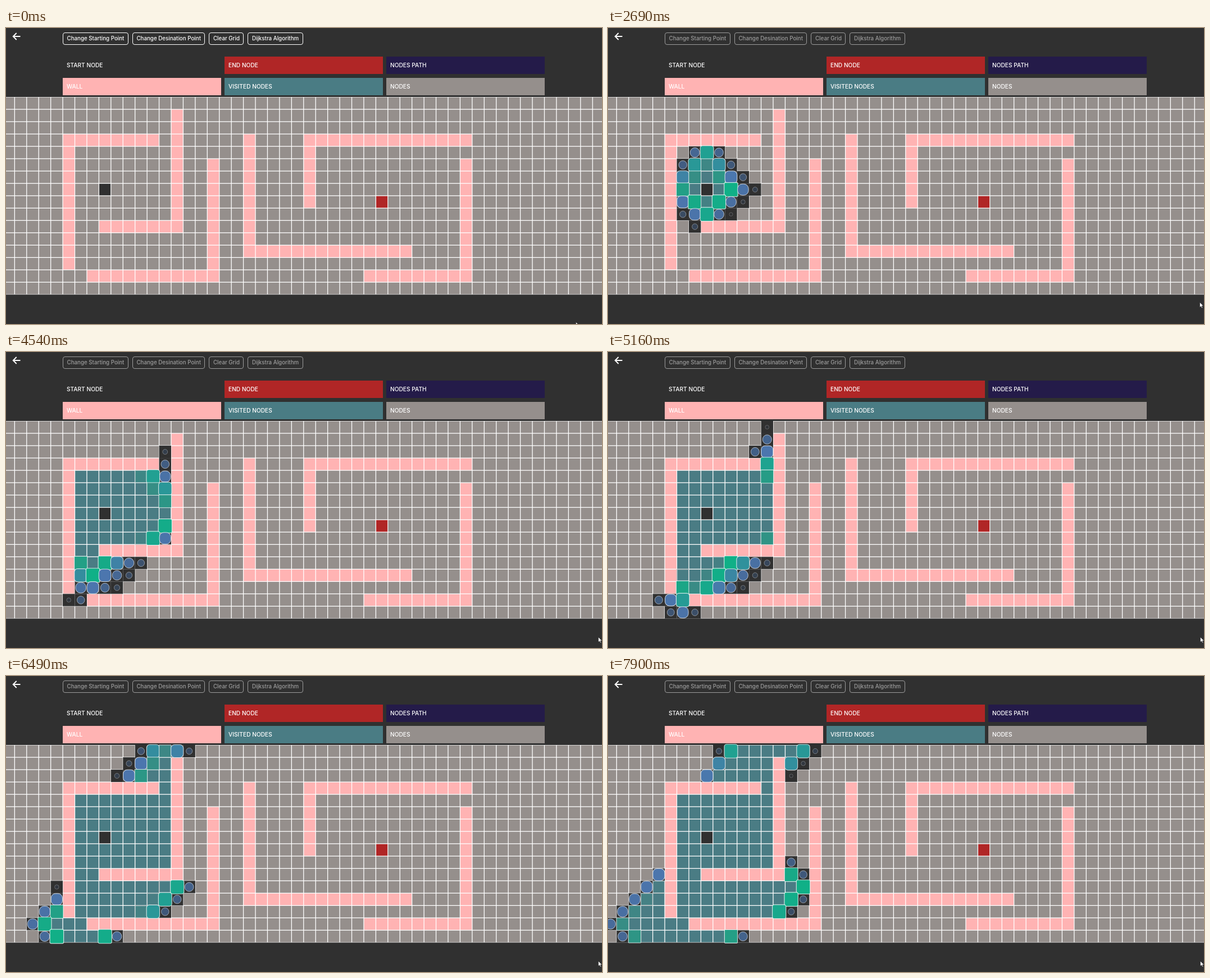
Recreate the animation shown at these times as an HTML page with a canvas. Size 1061x528 px, loop 7990 ms.

```html
<!DOCTYPE html>
<html lang="en">
<head>
<meta charset="utf-8">
<title>Pathfinding grid</title>
<style>
  html, body { margin: 0; width: 1061px; height: 528px; overflow: hidden; background: #303030; }
  body { position: relative; color: #fff; font: 500 9.75px Inter, "Open Sans", sans-serif; white-space: nowrap; }
  canvas, svg, #buttons, #keys { position: absolute; left: 0; top: 0; }
  #buttons { left: 101px; top: 8px; display: flex; gap: 7px; }
  #buttons div { border: 1px solid #fff; border-radius: 4px; padding: 0 6.5px; line-height: 20px; }
  #buttons.off div { opacity: .52; }
  #keys { left: 101px; top: 51px; display: grid; grid: repeat(2, 31px) / repeat(3, 282px); gap: 7px 6px; }
  #keys div { padding-left: 7px; font-size: 10.2px; line-height: 31px; }
</style>
</head>
<body>
<canvas id="stage" width="1061" height="528"></canvas>
<svg width="40" height="32" fill="none" stroke="#fff" stroke-width="1.9">
  <path d="M25.5 15H13M18.7 9L12.7 15L18.7 21"/>
</svg>
<div id="buttons"></div>
<div id="keys"></div>
<svg id="cursor" width="10" height="14">
  <path d="M.5 .5V9.6L2.6 7.7L4 10.8L5.5 10.2L4.1 7.1H7Z" fill="#fff" stroke="#222" stroke-width=".6"/>
</svg>
<script>
const LOOP = 7990, SEARCH = 1088, STEP = 50.05, GROW = 1500, CLICK = 1060;
const COLS = 50, ROWS = 16, W = 21.435, H = 22.03, X0 = -6.1, Y0 = 123, LINE = 0.65;
const DARK = '#303030', NODE = '#958f8c', WALL = '#ffb3b3', VISITED = '#4a7c84', RED = '#b02626';

const BUTTONS = ['Change Starting Point', 'Change Desination Point', 'Clear Grid', 'Dijkstra Algorithm'];
const KEYS = {
  'START NODE': DARK, 'END NODE': RED, 'NODES PATH': '#241b49',
  'WALL': WALL, 'VISITED NODES': VISITED, 'NODES': NODE
};

// Each wall is an L: corner column and row, then how far its two arms reach
const WALLS = [
  [5, 3, 12, 13], [14, 10, 8, 1], [17, 14, 7, 5],
  [20, 12, 33, 3], [25, 3, 38, 8], [38, 14, 30, 5]
];

// Stops of [position, value], eased from one to the next
const SCALE = [[0, 0.3], [0.75, 1.2], [1, 1]];
const ROUND = [[0, 1], [1, 0]];
const TINT = [[0, [46, 47, 49]], [0.5, [76, 118, 174]], [0.75, [16, 176, 135]], [1, [74, 124, 132]]];
const BUTTON = [507, 20], REST = [1054, 508];
const POINTER = [[0, [1015, 525]], [900, BUTTON], [1120, BUTTON], [1700, [1046, 352]], [3100, REST], [LOOP, REST]];

const $ = name => document.getElementById(name);
const ctx = $('stage').getContext('2d');

function addBox(parent, text, background = '') {
  const el = document.createElement('div');
  el.textContent = text;
  el.style.background = background;
  $(parent).append(el);
}
BUTTONS.forEach(text => addBox('buttons', text));
Object.entries(KEYS).forEach(([text, color]) => addBox('keys', text, color));

const id = (c, r) => r * COLS + c;
const start = id(8, 7), end = id(31, 8);

const walls = new Set();
for (const [c, r, toC, toR] of WALLS) {
  for (let x = Math.min(c, toC); x <= Math.max(c, toC); x++) walls.add(id(x, r));
  for (let y = Math.min(r, toR); y <= Math.max(r, toR); y++) walls.add(id(c, y));
}

// Breadth-first visiting order: up, left, right, down
function search() {
  const order = new Map([[start, 0]]);
  for (const [cell] of order) {
    const c = cell % COLS, r = Math.floor(cell / COLS);
    for (const [x, y] of [[c, r - 1], [c - 1, r], [c + 1, r], [c, r + 1]]) {
      const next = id(x, y);
      const inside = x >= 0 && y >= 0 && x < COLS && y < ROWS;
      if (inside && !walls.has(next) && !order.has(next)) order.set(next, order.size);
    }
  }
  return order;
}
const order = search();

// cubic-bezier(0, 0, .58, 1)
function easeOut(x) {
  let lo = 0, hi = 1;
  for (let i = 0; i < 18; i++) {
    const s = (lo + hi) / 2;
    if (1.74 * (1 - s) * s * s + s ** 3 < x) lo = s; else hi = s;
  }
  return 3 * (1 - lo) * lo * lo + lo ** 3;
}

function between(stops, p) {
  const i = Math.max(1, stops.findIndex(s => s[0] >= p));
  const [pa, a] = stops[i - 1], [pb, b] = stops[i];
  const e = easeOut((p - pa) / (pb - pa));
  const mix = (u, v) => u + (v - u) * e;
  return Array.isArray(a) ? a.map((v, k) => mix(v, b[k])) : mix(a, b);
}

function drawCell(c, r, color) {
  ctx.fillStyle = color;
  ctx.fillRect(X0 + c * W + LINE, Y0 + r * H + LINE, W - 2 * LINE, H - 2 * LINE);
}

function drawGrowing(c, r, p) {
  const s = between(SCALE, p), line = s;
  const w = W * s - line, h = H * s - line;
  ctx.beginPath();
  ctx.roundRect(X0 + (c + 0.5) * W - w / 2, Y0 + (r + 0.5) * H - h / 2, w, h,
    w * Math.min(0.5, between(ROUND, p)));
  ctx.fillStyle = `rgb(${between(TINT, p).map(Math.round)})`;
  ctx.fill();
  ctx.lineWidth = line;
  ctx.strokeStyle = 'rgba(255,255,255,.75)';
  ctx.stroke();
}

function drawGrid(t) {
  const growing = [];
  ctx.clearRect(0, 0, 1061, 528);
  ctx.fillStyle = '#fff';
  ctx.fillRect(X0, Y0, COLS * W, ROWS * H);
  for (let r = 0; r < ROWS; r++) {
    for (let c = 0; c < COLS; c++) {
      const k = id(c, r);
      const p = order.has(k) ? (t - SEARCH - order.get(k) * STEP) / GROW : -1;
      if (k === start) drawCell(c, r, DARK);
      else if (k === end) drawCell(c, r, RED);
      else if (walls.has(k)) drawCell(c, r, WALL);
      else if (p < 0) drawCell(c, r, NODE);
      else if (p >= 1) drawCell(c, r, VISITED);
      else growing.push([c, r, p]);
    }
  }
  ctx.fillStyle = DARK;
  for (const [c, r] of growing) ctx.fillRect(X0 + c * W, Y0 + r * H, W, H);
  for (const g of growing) drawGrowing(...g);
}

const begin = performance.now();
function draw() {
  const t = (performance.now() - begin) % LOOP;
  const [x, y] = between(POINTER, t);
  $('cursor').style.transform = `translate(${x}px, ${y}px)`;
  $('buttons').className = t >= CLICK ? 'off' : '';
  drawGrid(t);
  requestAnimationFrame(draw);
}
draw();
</script>
</body>
</html>
```
